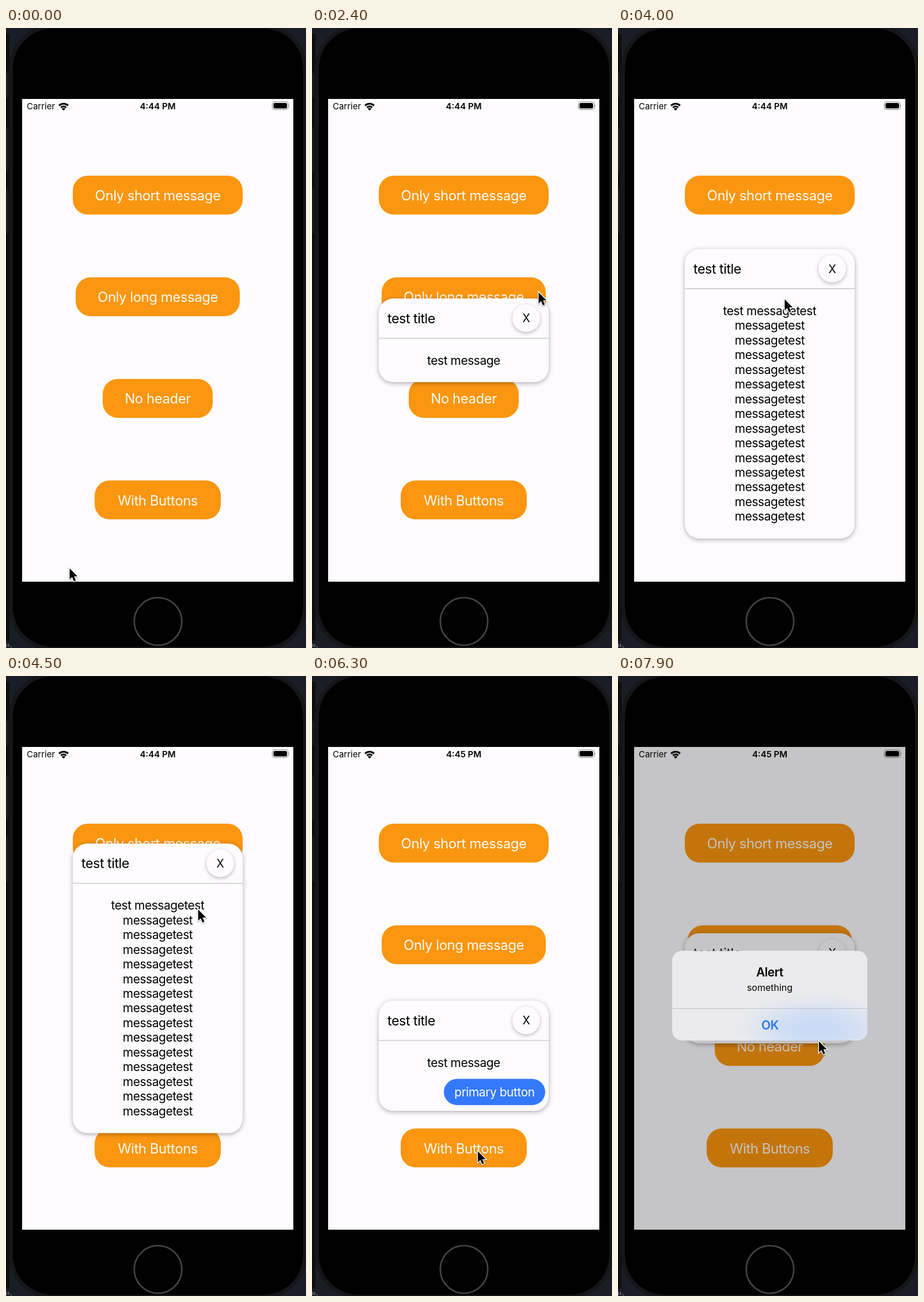
Write an HTML page that moves like this. It is 521x1075 px and loops after 8000 ms.

```html
<!DOCTYPE html>
<html lang="en">
<head>
<meta charset="utf-8">
<title>Popup demo</title>
<style>
  html, body { margin: 0; width: 100%; height: 100%; overflow: hidden; background: #000; }
  svg { display: block; width: 521px; height: 1075px; }
  text { font: 20.9px Inter, "Open Sans", sans-serif; font-optical-sizing: none; letter-spacing: -.02em; text-anchor: middle; }
  text.label { font-size: 24px; fill: #fffaf2; }
  text.title { font-size: 23.3px; text-anchor: start; }
  text.small { font-size: 15px; letter-spacing: 0; }
  text.bold { font-weight: 600; }
  .card { filter: drop-shadow(0 2px 4px rgba(0, 0, 0, .32)); }
  .close { filter: drop-shadow(0 2px 3px rgba(0, 0, 0, .28)); }
  #cursor { filter: drop-shadow(0 1px 1px rgba(0, 0, 0, .35)); }
</style>
</head>
<body>
<svg viewBox="0 0 521 1075">
  <defs>
    <clipPath id="screenClip"><rect x="28" y="123" width="471" height="837"/></clipPath>
    <clipPath id="alertClip"><rect x="94" y="476.5" width="339" height="155.5" rx="17"/></clipPath>
    <radialGradient id="blueGlow">
      <stop offset="0" stop-color="#c8d9f6"/>
      <stop offset=".45" stop-color="#cddcf5" stop-opacity=".85"/>
      <stop offset="1" stop-color="#dfe5f0" stop-opacity="0"/>
    </radialGradient>
  </defs>

  <rect width="521" height="1075" fill="#1b1d26"/>
  <rect y="10" width="6" height="1052" fill="#0e0e10"/>
  <path d="M0 78h4v42H0zM0 172h4v78H0zM0 278h4v78H0z" fill="#1a1a1c"/>
  <rect x="5" y="-6" width="518" height="1086" rx="76" fill="#161618"/>
  <rect x="12" y="1" width="504" height="1072" rx="69"/>
  <path d="M1 1068v5M4.5 1068v5M9 1072v2" stroke="#777" stroke-width="1.6"/>
  <circle cx="264" cy="1029" r="41.3" fill="none" stroke="#464646" stroke-width="2.6"/>

  <g clip-path="url(#screenClip)">
    <rect x="28" y="123" width="471" height="837" fill="#fefcff"/>
    <text class="small" x="60.5" y="141">Carrier</text>
    <g fill="none" stroke="#000" stroke-width="3">
      <path d="M92.2 134.6a11 11 0 0 1 15.6 0M95.5 138a6.3 6.3 0 0 1 9 0"/>
    </g>
    <path d="M100 143.3l-3.2-3.3a4.6 4.6 0 0 1 6.4 0z"/>
    <text class="small bold" id="clock" x="263.5" y="141"></text>
    <rect x="462.5" y="128" width="27.5" height="13.5" rx="4" fill="none" stroke="#8b8a8c" stroke-width="1.2"/>
    <rect x="464.5" y="130" width="23.5" height="9.5" rx="2.5"/>
    <path d="M491.4 132.5q1.8 2.2 0 4.6z" fill="#8b8a8c"/>
    <g id="buttons"></g>
    <g id="popups"></g>
    <rect id="dim" x="28" y="123" width="471" height="837"/>
  </g>

  <g id="alert">
    <g clip-path="url(#alertClip)">
      <rect x="94" y="476" width="339" height="157" fill="#ebebed"/>
      <ellipse cx="345" cy="612" rx="150" ry="66" fill="url(#blueGlow)"/>
      <path d="M94 576.5h339" stroke="#bfc0c6"/>
    </g>
    <text class="bold" x="263.5" y="521.3">Alert</text>
    <text class="small" x="263.5" y="546.3" style="font-size:16px">something</text>
    <text class="bold" x="264" y="612.5" fill="#2b7af1">OK</text>
  </g>

  <path id="cursor" d="M0 0V19.2L4.3 15.1 7.6 22.4 10.8 21 7.7 13.8H13.7Z"
        stroke="#fff" stroke-width="2.8" paint-order="stroke"/>
</svg>
<script>
const LOOP = 8000, STEP = 100, SLIDE = 500, TRAVEL = 837;
const $ = id => document.getElementById(id);
const clamp = v => Math.min(1, Math.max(0, v));
const ease = p => (1 - Math.cos(Math.PI * clamp(p))) / 2;

const buttons = [
  ["Only short message", 295], ["Only long message", 285],
  ["No header", 191], ["With Buttons", 219]
];
$("buttons").innerHTML = buttons.map(([label, w], i) => {
  const y = 256 + i * 176.2;
  return `<rect x="${263.5 - w / 2}" y="${y}" width="${w}" height="67.5" rx="26" fill="#fb9610"/>
    <text class="label" x="263.5" y="${y + 43}">${label}</text>`;
}).join("");

const longLines = ["test messagetest", ...Array(14).fill("messagetest")];
const popups = [
  { top: 469, height: 145, lines: ["test message"], open: 1481, press: 2600, close: 2700 },
  { top: 290.5, height: 502, lines: longLines, open: 3608, press: 4950, close: 5060 },
  { top: 446, height: 191, lines: ["test message"], action: "primary button", open: 5922 }
];

function popupMarkup({ height, lines, action }) {
  const message = lines.map((line, i) =>
    `<text x="263.5" y="${114.7 + i * 25.46}">${line}</text>`).join("");
  const button = action ? `<rect x="229" y="135.5" width="176" height="45.5" rx="22.75" fill="#3479fb"/>
    <text x="317" y="165.7" fill="#fff">${action}</text>` : "";
  return `<rect class="card" x="116" width="295" height="${height}" rx="25" fill="#fefcff"/>
    <path d="M116 68.8h295" stroke="#c4c3c6" stroke-width="1.3"/>
    <text class="title" x="131" y="42.5">test title</text>
    <circle class="close" cx="372" cy="34.2" r="24"/>
    <text x="372" y="41.3" style="font-size:19.5px">X</text>${message}${button}`;
}

for (const popup of popups) {
  popup.node = document.createElementNS("http://www.w3.org/2000/svg", "g");
  popup.node.innerHTML = popupMarkup(popup);
  popup.knob = popup.node.querySelector(".close");
  $("popups").append(popup.node);
}

// Cursor stops: time, x, y
const stops = [
  [300, 110.5, 937], [1300, 226, 299.5], [1800, 226, 299.5], [2400, 393.5, 458.5],
  [2600, 378, 502], [2900, 378, 502], [3400, 289.5, 470.5], [4200, 289.5, 470.5],
  [4800, 378, 339.5], [5350, 378, 339.5], [5850, 288, 824], [6450, 288, 824],
  [7100, 342, 612], [7500, 342, 612], [7850, 349, 633.5]
];

function cursorAt(t) {
  const next = stops.findIndex(s => s[0] > t);
  if (next < 1) return stops.at(next).slice(1);
  const [t0, x0, y0] = stops[next - 1], [t1, x1, y1] = stops[next];
  const p = ease((t - t0) / (t1 - t0));
  return [x0 + (x1 - x0) * p, y0 + (y1 - y0) * p];
}

function draw(t) {
  for (const { node, knob, top, open, press = Infinity, close = Infinity } of popups) {
    const away = 1 - ease((t - open) / SLIDE) + ease((t - close) / SLIDE);
    node.setAttribute("transform", `translate(0 ${top + away * TRAVEL})`);
    node.style.display = away < 1 ? "" : "none";
    knob.setAttribute("fill", t >= press ? "#000" : "#fefcff");
  }
  $("clock").textContent = t < 5700 ? "4:44 PM" : "4:45 PM";

  const shown = ease((t - 7350) / 350);
  const scale = 1.15 - .15 * shown;
  $("dim").setAttribute("opacity", .225 * shown);
  $("alert").setAttribute("opacity", shown);
  $("alert").setAttribute("transform", `translate(263.5 554) scale(${scale}) translate(-263.5 -554)`);
  $("cursor").setAttribute("transform", `translate(${cursorAt(t)})`);
}

const start = performance.now();
function tick(now) {
  const t = Math.max(0, now - start) % LOOP;
  draw(Math.floor(t / STEP) * STEP);
  requestAnimationFrame(tick);
}
tick(start);
</script>
</body>
</html>
```
